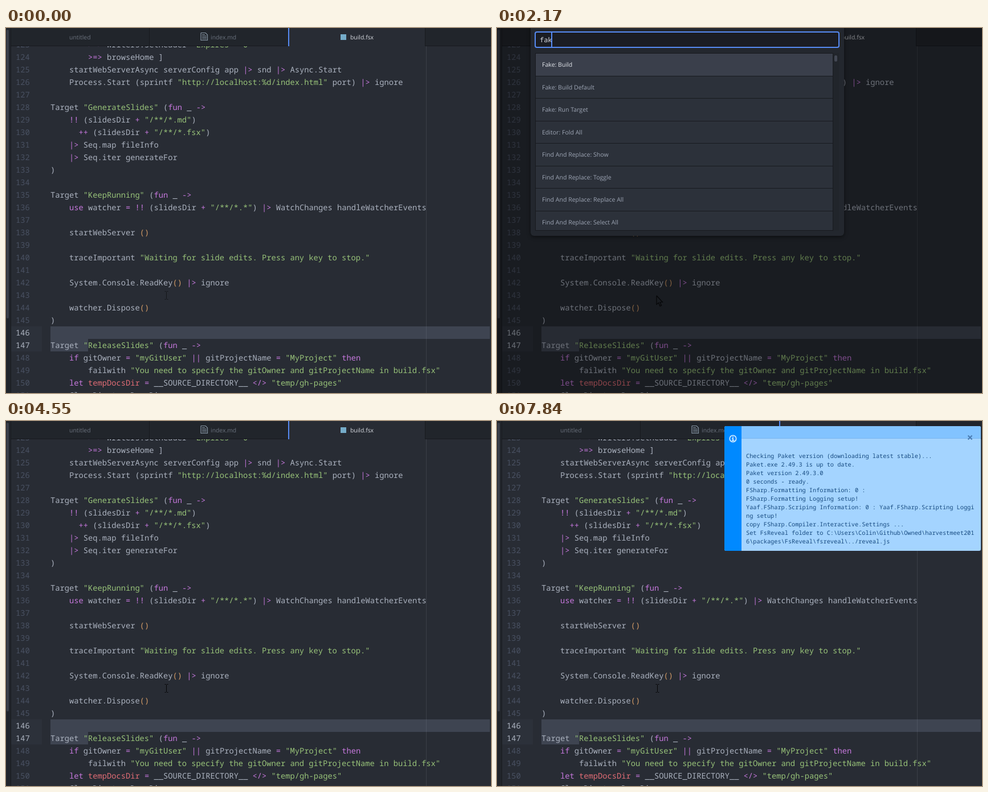
Write an HTML page with a canvas that moves like this. It is 851 px wide and 641 px high and loops after 8 s.

```html
<!DOCTYPE html>
<html lang="en">
<head>
<meta charset="utf-8">
<title>Running a build target from the editor</title>
<style>
html, body { margin: 0; width: 100%; height: 100%; overflow: hidden; background: #282c34; }
canvas { display: block; }
</style>
</head>
<body>
<canvas width="851" height="641"></canvas>
<script>
const ctx = document.querySelector('canvas').getContext('2d');
const LOOP = 8000, W = 851, H = 641;
const CHAR = 8.247, LINE = 22, CODE_X = 78;
const MONO = '"Noto Sans Mono", "DejaVu Sans Mono", monospace';
const UI = '"Open Sans", "Noto Sans", sans-serif';
const CODE_FONT = `13.745px ${MONO}`;
const BLUE = '#568af2', EDGE = '#181a1f', BAR = '#21252b';
const GREY = '#abb2bf', PURPLE = '#c678dd', GREEN = '#98c379', ORANGE = '#d19a66', RED = '#e06c75';

const code = String.raw`        >=> Writers.setHeader "Expires" "0"
        >=> browseHome ]
    startWebServerAsync serverConfig app |> snd |> Async.Start
    Process.Start (sprintf "http://localhost:%d/index.html" port) |> ignore

Target "GenerateSlides" (fun _ ->
    !! (slidesDir + "/**/*.md")
      ++ (slidesDir + "/**/*.fsx")
    |> Seq.map fileInfo
    |> Seq.iter generateFor
)

Target "KeepRunning" (fun _ ->
    use watcher = !! (slidesDir + "/**/*.*") |> WatchChanges handleWatcherEvents

    startWebServer ()

    traceImportant "Waiting for slide edits. Press any key to stop."

    System.Console.ReadKey() |> ignore

    watcher.Dispose()
)

Target "ReleaseSlides" (fun _ ->
    if gitOwner = "myGitUser" || gitProjectName = "MyProject" then
        failwith "You need to specify the gitOwner and gitProjectName in build.fsx"
    let tempDocsDir = __SOURCE_DIRECTORY__ </> "temp/gh-pages"
    CleanDir tempDocsDir`.split('\n');

const log = String.raw`Checking Paket version (downloading latest stable)...
Paket.exe 2.49.3 is up to date.
Paket version 2.49.3.0
0 seconds - ready.
FSharp.Formatting Information: 0 :
FSharp.Formatting Logging setup!
Yaaf.FSharp.Scriping Information: 0 : Yaaf.FSharp.Scripting Loggi
ng setup!
copy FSharp.Compiler.Interactive.Settings ...
Set FsReveal folder to C:\Users\Colin\Github\Owned\harvestmeet201
6\packages\FsReveal\fsreveal\../reveal.js`.split('\n');

const lists = {
  all: ['About: View Release Notes', 'Advanced Open File: Toggle|Ctrl+Alt+O', 'Application: About',
    'Application: Add Project Folder|Ctrl+Alt+O', 'Application: Bring All Windows To Front',
    'Application: Hide', 'Application: Hide Other Applications', 'Application: Install Update'],
  f: ['Find And Replace: Show', 'Find And Replace: Toggle', 'Fuzzy Finder: Toggle File Finder',
    'Editor: Fold All', 'Editor: Fold Selection', 'Window: Focus Next Pane',
    'Advanced Open File: Toggle', 'Application: Add Project Folder'],
  fa: ['Fake: Build', 'Fake: Build Default', 'Fake: Run Target', 'Editor: Fold All',
    'Find And Replace: Show', 'Find And Replace: Toggle', 'Find And Replace: Replace All',
    'Find And Replace: Select All'],
  fake: ['Fake: Build', 'Fake: Build Default', 'Fake: Run Target', 'Fake: Show Output'],
  targets: ['Clean', 'GenerateSlides', 'KeepRunning', 'ReleaseSlides']
};

// start time, query, list, selected row, caret shown, backdrop strength
const paletteSteps = [
  [1260, '', 'all', 0, 1, .31], [1330, '', 'all', 0, 1, .37], [1470, '', 'all', 0, 0, .37],
  [1680, 'f', 'all', 0, 1, .37], [1820, 'f', 'f', 0, 1, .37], [1960, 'fa', 'f', 0, 1, .37],
  [2030, 'fa', 'fa', 0, 1, .37], [2170, 'fak', 'fa', 0, 1, .37], [2240, 'fake', 'fa', 0, 1, .37],
  [2310, 'fake', 'fake', 0, 1, .37], [2590, 'fake', 'fake', 0, 0, .37],
  [2870, '', 'targets', 0, 1, .18], [2940, '', 'targets', 0, 1, .37], [3220, '', 'targets', 0, 0, .37],
  [3570, '', 'targets', 0, 1, .37], [3780, '', 'targets', 1, 1, .37], [3920, '', 'targets', 1, 0, .37],
  [4340, '', 'targets', 1, 1, .37], [4550]
];
const logSteps = [[4670, 1], [6930, 2], [7000, 3], [7490, 4], [7840, 11]];

const stepAt = (steps, t) => steps.filter(s => s[0] <= t).pop();

function rect(x, y, w, h, color) {
  ctx.fillStyle = color;
  ctx.fillRect(x, y, w, h);
}

function box(x, y, w, h, r, fill, stroke, lineWidth = 1) {
  ctx.beginPath();
  ctx.roundRect(x, y, w, h, r);
  ctx.fillStyle = fill;
  ctx.fill();
  if (!stroke) return;
  ctx.strokeStyle = stroke;
  ctx.lineWidth = lineWidth;
  ctx.stroke();
}

function text(s, x, y, color, font) {
  ctx.font = font;
  ctx.fillStyle = color;
  ctx.fillText(s, x, y);
}

function lines(color, width, ...paths) {
  ctx.strokeStyle = color;
  ctx.lineWidth = width;
  ctx.beginPath();
  for (const [x, y, ...rest] of paths) {
    ctx.moveTo(x, y);
    for (let i = 0; i < rest.length; i += 2) ctx.lineTo(rest[i], rest[i + 1]);
  }
  ctx.stroke();
}

const TOKEN = /"[^"]*"|(?<=let )\w+|\b(?:fun|use|let|if|then)\b|\(\)|>=>|\|>|<\/>|->|!!|\+\+|\|\||[+=]|[^\s"]/g;

function tokenColor(s, line, at) {
  if (s[0] === '"') return GREEN;
  if (s === '()') return ORANGE;
  if (line.slice(0, at).endsWith('let ')) return RED;
  return /^(fun|use|let|if|then|[>|<\-!+=]+\/?>?)$/.test(s) ? PURPLE : GREY;
}

function drawCode() {
  rect(0, 0, W, H, '#282c34');
  rect(9, 524, 54, 44, '#2c313a');
  rect(CODE_X, 524, 771, LINE, '#3e4451');
  rect(CODE_X, 546, 66, LINE, '#3e4451');
  rect(737, 32, 1, H, 'rgba(171,178,191,.14)');
  code.forEach((line, i) => {
    const y = 34 + i * LINE, number = 123 + i;
    text(number, 17, y, number === 146 || number === 147 ? GREY : '#495162', CODE_FONT);
    for (const { 0: s, index } of line.matchAll(TOKEN))
      text(s, CODE_X + index * CHAR, y, tokenColor(s, line, index), CODE_FONT);
  });
}

function drawTabs() {
  rect(0, 0, W, 32, BAR);
  rect(0, 31, W, 1, EDGE);
  rect(251, 0, 1, 32, EDGE);
  rect(495, 0, 241, 32, '#282c34');
  rect(495, 0, 2, 32, BLUE);
  rect(735, 0, 1, 32, EDGE);
  rect(0, 0, 8, H, BAR);
  rect(8, 0, 1, H, EDGE);
  box(1, 3, 4, 507, 2, '#3a3f4a');
  const font = `10.4px ${UI}`;
  text('untitled', 111, 20, '#6b727e', font);
  text('index.md', 359, 20, '#6b727e', font);
  text('build.fsx', 604, 20, '#d7dae0', font);
  lines('#8594a2', 1.2, [342, 8.5, 350, 8.5, 353.5, 12, 353.5, 21.5, 342, 21.5, 342, 8.5],
    [344, 11.5, 349, 11.5], [344, 14, 352, 14], [344, 16.5, 352, 16.5], [344, 19, 352, 19]);
  rect(587, 11, 10, 10, '#75acc9');
}

function drawIBeam(color) {
  lines(color, 1, [278.5, 462.5, 280.5, 462.5, 281.5, 463.5, 281.5, 475.5, 280.5, 476.5, 278.5, 476.5],
    [284.5, 462.5, 282.5, 462.5, 281.5, 463.5], [284.5, 476.5, 282.5, 476.5, 281.5, 475.5]);
}

function drawArrow() {
  lines('#090a0c', 1.2, [280, 470, 280, 485.5, 283.5, 482.5, 286, 488.5, 288.5, 487.5,
    286, 481.5, 290.5, 481.5, 280, 470]);
}

function drawPalette([, query, name, selected, caret]) {
  const items = lists[name], long = items.length > 7, right = long ? 589.5 : 599.5;
  const bottom = Math.min(44.5 + 39.5 * items.length, 355.5);
  ctx.save();
  ctx.shadowColor = 'rgba(0,0,0,.5)';
  ctx.shadowBlur = 6;
  ctx.shadowOffsetY = 2;
  box(59, -8, 550, bottom + 17.5, 6, '#23272e');
  ctx.restore();
  box(67, 7, 533, 27, 3, '#1b1d23', BLUE, 2);
  text(query, 75, 25, '#d7dae0', `11.92px ${MONO}`);
  if (caret) rect(Math.floor(74 + 7.15 * query.length), 8, 2, 25, BLUE);

  ctx.save();
  ctx.beginPath();
  ctx.rect(67, 44, right - 66.5, bottom - 43.5);
  ctx.clip();
  items.forEach((item, i) => {
    const [label, key] = item.split('|'), y = 44.5 + 39.5 * i, mid = Math.floor(y + 20);
    const active = i === selected;
    rect(67, y, right - 67, 40, active ? '#3a3f4b' : '#2c313a');
    rect(67, Math.floor(y), right - 67, 1, EDGE);
    text(label, 79, mid + 4, active ? '#e4e7ec' : '#9da5b4', `10.55px ${UI}`);
    if (key) {
      box(508.5, mid - 11.5, 74, 23, 2.5, '#3c424c', '#555c68');
      ctx.letterSpacing = '1px';
      text(key, 513, mid + 4, '#a6aebb', `10.55px ${UI}`);
      ctx.letterSpacing = '0px';
    }
  });
  ctx.restore();
  ctx.strokeStyle = EDGE;
  ctx.lineWidth = 1;
  ctx.strokeRect(67.5, 44.5, right - 67.5, bottom - 44.5);
  if (long) {
    rect(590, 44, 10, 312, BAR);
    box(592, 48, 5, 11, 2.5, '#434854');
  }
}

function drawNotice(count, p) {
  const bottom = 63 + 15 * count;
  ctx.save();
  ctx.globalAlpha = p;
  ctx.translate(0, 9 - 30 * (1 - p));
  ctx.scale(1, Math.sin(p * Math.PI / 2));
  ctx.translate(0, -9);
  box(399, 9, 450, bottom - 9, 3, '#a4d4ff');
  box(429, 9, 420, 21, [0, 3, 0, 0], '#82c3ff');
  rect(429, 30, 420, 1, '#7ab5ee');
  box(399, 9, 30, bottom - 9, [3, 0, 0, 3], '#0089ff');
  ctx.beginPath();
  ctx.arc(414, 31, 5.7, 0, 7);
  ctx.strokeStyle = '#d5ecff';
  ctx.lineWidth = 1.7;
  ctx.stroke();
  rect(413, 27.5, 2, 1.8, '#d5ecff');
  lines('#d5ecff', 1.6, [412, 30.7, 414.2, 30.7, 414.2, 34.5], [412, 34.3, 416.4, 34.3]);
  lines('#4b7eb4', 2.2, [826.5, 25.5, 833.5, 32.5], [833.5, 25.5, 826.5, 32.5]);
  log.slice(0, count).forEach((s, i) => text(s, 437, 65 + 15 * i, '#174b80', `10.28px ${MONO}`));
  ctx.restore();
}

function draw(t) {
  ctx.textRendering = 'geometricPrecision';
  drawCode();
  drawTabs();
  const step = stepAt(paletteSteps, t), open = step && step.length > 1;
  if (open) {
    drawArrow();
    rect(0, 0, W, H, `rgba(0,0,0,${step[5]})`);
    drawPalette(step);
  } else {
    drawIBeam(t < 70 ? '#14161a' : '#050506');
  }
  const notice = stepAt(logSteps, t);
  if (notice) drawNotice(notice[1], Math.min(1, (t - 4670) / 160));
}

function frame() {
  draw(performance.now() % LOOP);
  requestAnimationFrame(frame);
}
frame();
</script>
</body>
</html>
```
